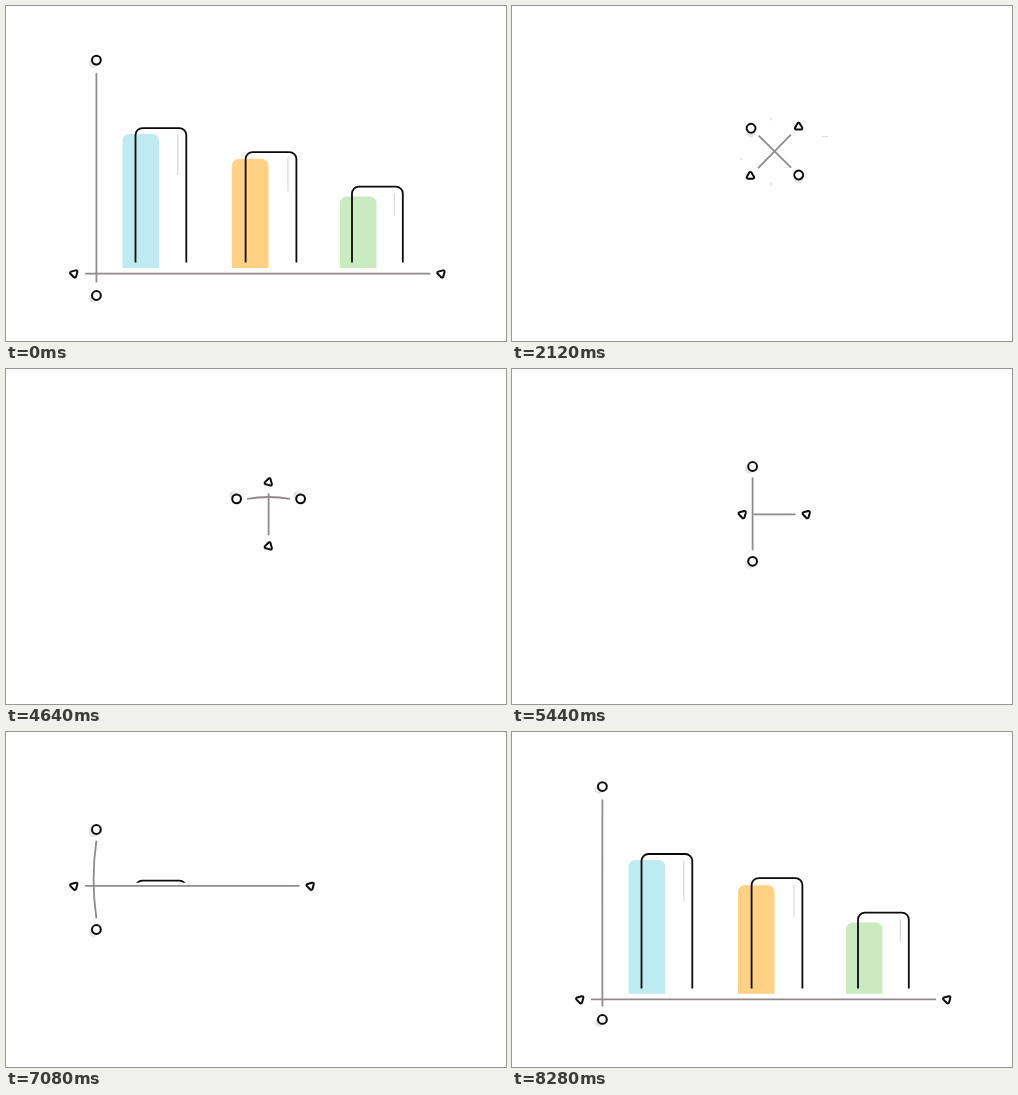
Write an HTML page with a canvas that moves like this. It is 500x335 px and loops after 8320 ms.

```html
<!DOCTYPE html>
<html lang="en">
<head>
<meta charset="utf-8">
<title>Chart loop</title>
<style>
  html, body { margin: 0; width: 100%; height: 100%; overflow: hidden; background: #fff; }
  canvas { display: block; width: 500px; height: 335px; }
</style>
</head>
<body>
<canvas id="stage"></canvas>
<script>
const LOOP = 8320, PX = 262.6, PY = 145.3, RAD = Math.PI / 180;
const AXIS = '#918a8c', INK = '#0a0a0a', FAINT = '#dedede';
const canvas = document.getElementById('stage');
const ctx = canvas.getContext('2d');
const dpr = window.devicePixelRatio || 1;
canvas.width = 500 * dpr;
canvas.height = 335 * dpr;

// Easing: each maps time t to progress from a to b
const part = (t, a, b) => Math.min(1, Math.max(0, (t - a) / (b - a)));
const bump = (t, a, b) => Math.sin(Math.PI * part(t, a, b));
const sine = (t, a, b) => (1 - Math.cos(Math.PI * part(t, a, b))) / 2;
const glide = (t, a, b) => 1 - (1 - part(t, a, b) ** 1.5) ** 5;
const inOut = (t, a, b) => {
  const p = part(t, a, b);
  return p < .5 ? 8 * p ** 4 : 1 - 8 * (1 - p) ** 4;
};
// Damped step response: peaks after the given time, damp sets the overshoot
const spring = (t, start, peak, damp) => {
  const x = Math.PI * Math.max(0, t - start) / peak;
  return 1 - Math.exp(-damp * x) * (Math.cos(x) + damp * Math.sin(x));
};
// Dying wave for the bowed axis
const ripple = (t, start, amp) => {
  const x = Math.max(0, t - start);
  return amp * Math.exp(-x / 300) * Math.sin(2 * Math.PI * x / 640);
};
// A value that moves on to each [goal, progress] in turn
const path = (v, ...steps) => steps.reduce((a, [goal, k]) => a + (goal - a) * k, v);

// Places relative to the pivot: chart, cross, bow, chart again
function pose(t) {
  const shrink = glide(t, 880, 2700), meet = glide(t, 880, 2300);
  const stretch = inOut(t, 4680, 5280), grow = spring(t, 7030, 500, .8);
  return {
    left: path(-194.5, [-32, shrink], [-194.5, inOut(t, 5345, 7125)]),
    right: path(172.7, [32, shrink], [172.7, grow]),
    y: path(122.3, [0, meet], [122.3, grow]),
    x: path(-172.2, [0, meet], [-22, glide(t, 4440, 5000)], [-172.2, inOut(t, 5575, 7075)]),
    top: path(-91.2, [-32, shrink], [-47.8, stretch], [-91.2, spring(t, 7660, 340, .68)]),
    bottom: path(144.2, [32, shrink], [47, stretch], [144.2, spring(t, 7030, 500, .36)]),
    bend: ripple(t, 4480, -3.2) + ripple(t, 6160, 6.5) + ripple(t, 6920, -5),
    turn: -630 * sine(t, 1660, 4320) - 90 * sine(t, 4680, 5150)
  };
}

const bars = [
  { fillX: 116.5, fillH: 134, x: 129.5, h: 134.5, color: '#bdebf1' },
  { fillX: 226, fillH: 109, x: 239.6, h: 110.5, color: '#ffd184' },
  { fillX: 334, fillH: 71.5, x: 346, h: 76, color: '#c9ebbf' }
];

function stroke(color, width) {
  ctx.strokeStyle = color;
  ctx.lineWidth = width;
  ctx.stroke();
}

function fill(color) {
  ctx.fillStyle = color;
  ctx.fill();
}

function line(x1, y1, x2, y2, color, width) {
  ctx.beginPath();
  ctx.moveTo(x1, y1);
  ctx.lineTo(x2, y2);
  stroke(color, width);
}

// Round-topped bar shape, cut off at its base
function arch(x, base, h, w, r, paint) {
  const top = base - h, low = base + 20;
  ctx.save();
  ctx.beginPath();
  ctx.rect(0, 0, 500, base);
  ctx.clip();
  ctx.beginPath();
  ctx.moveTo(x, low);
  ctx.arcTo(x, top, x + w, top, r);
  ctx.arcTo(x + w, top, x + w, low, r);
  ctx.lineTo(x + w, low);
  paint();
  ctx.restore();
}

function drawBar(b, i, t, axisY) {
  const size = lag => t < 4000
    ? 1 - inOut(t, 860 + 60 * i, 1180 + 60 * i)
    : spring(t, 7060 + 140 * i + lag, 480, .9);
  const g = size(0), f = size(40);
  if (f > 0) arch(b.fillX, axisY - 5.6, b.fillH * f, 36.5, 6.5, () => fill(b.color));
  if (g <= 0) return;
  const base = axisY - 3 - 8 * Math.min(1, g * 2);
  arch(b.x, base, b.h * g, 50.8, 7, () => stroke(INK, 1.8));
  const shine = part(g, .7, 1), top = base - b.h + 6.5;
  if (shine > 0) line(b.x + 42.3, top, b.x + 42.3, top + .3 * b.h * shine, FAINT, 1.4);
}

function disc(x, y, r) {
  ctx.beginPath();
  ctx.arc(x, y, r, 0, 2 * Math.PI);
}

function drawCircle(x, y) {
  disc(x - 3.3, y + 2.9, 4.5);
  fill('#e6e6e6');
  disc(x, y, 4.4);
  fill('#fff');
  stroke(INK, 2);
}

function drawTriangle(x, y) {
  const [a, b, c] = [75, 195, 315].map(d => [x + 5.4 * Math.cos(d * RAD), y + 5.4 * Math.sin(d * RAD)]);
  ctx.beginPath();
  ctx.moveTo((a[0] + c[0]) / 2, (a[1] + c[1]) / 2);
  for (const [p, q] of [[a, b], [b, c], [c, a]]) ctx.arcTo(...p, ...q, 1.3);
  ctx.closePath();
  fill('#fff');
  stroke(INK, 2);
}

function drawArc(mid, half) {
  if (half <= 0) return;
  ctx.beginPath();
  ctx.arc(0, 0, 47.5, (mid - half) * RAD, (mid + half) * RAD);
  stroke(FAINT, 1.3);
}

function drawAxes(t, p) {
  const gap = 9.7 + .014 * (p.bottom - p.top);
  ctx.save();
  ctx.translate(PX, PY);
  ctx.rotate(p.turn * RAD);
  drawArc(-16, 30 * bump(t, 2300, 4250));
  drawArc(174, 18 * bump(t, 2300, 3760));
  line(p.left + 11, p.y, p.right - 11, p.y, AXIS, 1.8);
  ctx.beginPath();
  ctx.moveTo(p.x, p.top + gap);
  ctx.quadraticCurveTo(p.x + 2 * p.bend, (p.top + p.bottom) / 2, p.x, p.bottom - gap);
  stroke(AXIS, 1.8);
  for (const y of [p.top, p.bottom]) drawCircle(p.x, y);
  for (const x of [p.left, p.right]) drawTriangle(x, p.y);
  ctx.restore();
}

function drawMarks(t) {
  const k = 3 * bump(t, 1880, 2360);
  if (k > 0) {
    line(310, 130.5, 310 + 2 * k, 130.5, FAINT, 1.2);
    line(228, 153, 228 + k, 153, FAINT, 1.2);
    for (const y of [111.5, 177]) line(259, y, 259, y + k, FAINT, 1.2);
  }
  const d = part(t, 6180, 6500);
  if (d > 0 && d < 1) for (const y of [138.5, 151]) line(285 - 176 * d, y, 285 - 176 * d * d, y, FAINT, 1.3);
}

function frame(t) {
  const p = pose(t);
  ctx.setTransform(dpr, 0, 0, dpr, 0, 0);
  ctx.fillStyle = '#fff';
  ctx.fillRect(0, 0, 500, 335);
  drawMarks(t);
  bars.forEach((b, i) => drawBar(b, i, t, PY + p.y));
  drawAxes(t, p);
}

const start = performance.now();
function loop() {
  frame((performance.now() - start) % LOOP);
  requestAnimationFrame(loop);
}
loop();
</script>
</body>
</html>
```
